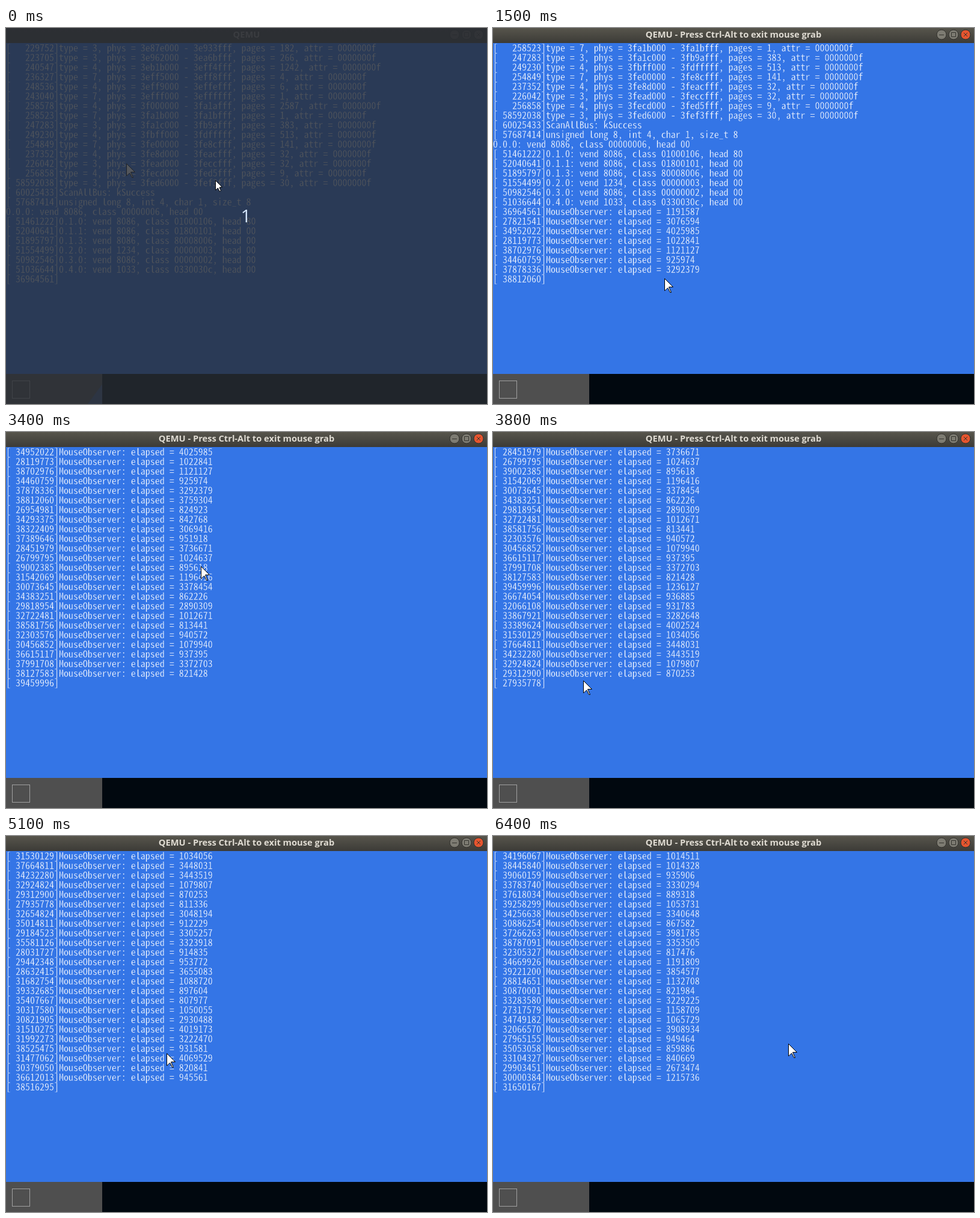
Animation, 800 px wide and 625 px high, one loop 8 s. Source, as an HTML page with a canvas:

```html
<!DOCTYPE html>
<html lang="en">
<head>
<meta charset="utf-8">
<title>QEMU</title>
<style>
html, body { margin: 0; width: 100%; height: 100%; overflow: hidden; background: #01080f; }
canvas { display: block; }
</style>
</head>
<body>
<canvas id="stage" width="800" height="625"></canvas>
<script>
const ctx = document.getElementById('stage').getContext('2d');
const LOOP = 8000, STEP = 100, ROWS = 25, CELL = 8, LINE = 16, TOP = 25;
const BLUE = '#3475e6';

let seed = 20;
function random(min, max) {
  seed = (seed * 1664525 + 1013904223) % 4294967296;
  return Math.floor(min + (max - min) * seed / 4294967296);
}

const entry = (tick, body) => ({ head: `[${String(tick).padStart(9)}]`, body });

// Memory map: type, pages, gap in pages before the block
const blocks = [[3, 182], [3, 266, 46], [4, 1242, 175], [7, 4], [4, 6], [7, 1], [4, 2587],
  [7, 1], [3, 383], [4, 513, 100], [7, 141], [4, 32], [3, 32], [4, 9], [3, 30]];

function memoryMap() {
  let page = 0x3e87e;
  return blocks.map(([type, pages, gap = 0], i) => {
    const from = page + gap;
    page = from + pages;
    const phys = `${from.toString(16)}000 - ${(page - 1).toString(16)}fff`;
    return entry(i < blocks.length - 1 ? random(220000, 260000) : 58592038,
      `type = ${type}, phys = ${phys}, pages = ${pages}, attr = 0000000f`);
  });
}

const devices = [
  '0.1.0: vend 8086, class 01000106, head 80',
  '0.1.1: vend 8086, class 01800101, head 00',
  '0.1.3: vend 8086, class 80008006, head 00',
  '0.2.0: vend 1234, class 00000003, head 00',
  '0.3.0: vend 8086, class 00000002, head 00',
  '0.4.0: vend 1033, class 0330030c, head 00'
];

// A mouse event is short, middling or slow, about equally often
function mouseEvent() {
  const kind = random(0, 3);
  const elapsed = kind === 0 ? random(800000, 970000)
    : kind === 1 ? random(1000000, 1240000) : random(2500000, 4100000);
  return entry(random(26500000, 39500000), `MouseObserver: elapsed = ${elapsed}`);
}

const log = [
  ...memoryMap(),
  entry(60025433, 'ScanAllBus: kSuccess'),
  entry(57687414, 'unsigned long 8, int 4, char 1, size_t 8'),
  { head: '', body: '0.0.0: vend 8086, class 00000006, head 00' },
  ...devices.map(body => entry(random(50200000, 52400000), body)),
  ...Array.from({ length: 85 }, mouseEvent)
];

// time, first visible log line
const scroll = [[1200, 0], [1700, 11], [1900, 11], [2000, 12], [2800, 12], [2900, 13],
  [3400, 26], [3700, 35], [3800, 36], [3900, 36], [4000, 37], [4200, 37], [4500, 43],
  [5100, 55], [6400, 84]];

// time, x, y of the pointer inside the guest
const path = [[1200, 200, 225], [1500, 285, 416], [1700, 300, 421], [2800, 300, 421],
  [2900, 313, 424], [3000, 430, 445], [3200, 605, 310], [3400, 324, 223], [3800, 150, 413],
  [4200, 150, 413], [4500, -1, 401], [5100, 267, 361], [5600, 325, 520], [6050, 508, 470],
  [6400, 491, 345]];

// Value n of the keys at time t, straight or on a smooth curve that rests at pauses
function sample(keys, t, n, smooth) {
  const last = keys.length - 1;
  if (t <= keys[0][0]) return keys[0][n];
  if (t >= keys[last][0]) return keys[last][n];
  const i = keys.findIndex(k => k[0] >= t);
  const a = keys[i - 1], b = keys[i], span = b[0] - a[0], p = (t - a[0]) / span;
  if (!smooth) return Math.round(a[n] + (b[n] - a[n]) * p);
  const still = (j, k) => keys[j][1] === keys[k][1] && keys[j][2] === keys[k][2];
  const slope = j => {
    if (j === 0 || j === last || still(j - 1, j) || still(j, j + 1)) return 0;
    return (keys[j + 1][n] - keys[j - 1][n]) / (keys[j + 1][0] - keys[j - 1][0]);
  };
  const q = 1 - p, ease = p * p * (3 - 2 * p);
  return Math.round(a[n] + (b[n] - a[n]) * ease
    + span * p * q * (q * slope(i - 1) - p * slope(i)));
}

function rect(x, y, w, h, fill) {
  ctx.fillStyle = fill;
  ctx.fillRect(x, y, w, h);
}

function text(str, x, y, font, fill, align = 'left') {
  ctx.font = font;
  ctx.fillStyle = fill;
  ctx.textAlign = align;
  ctx.fillText(str, x, y);
}

function polygon(points, x, y) {
  ctx.beginPath();
  points.forEach(([px, py]) => ctx.lineTo(x + px, y + py));
  ctx.closePath();
}

function pointer(points, x, y) {
  polygon(points, x, y);
  ctx.fillStyle = '#fff';
  ctx.fill();
  ctx.strokeStyle = '#000';
  ctx.lineWidth = 1;
  ctx.stroke();
}

const guestArrow = [[.5, .5], [14.5, 14.5], [7.5, 14.5], [11.5, 23.5], [9.5, 23.5],
  [6, 16.5], [5, 16.5], [.5, 21]];
const hostArrow = [[.5, .5], [11.5, 11.5], [7, 12], [9.5, 17.5], [7, 18.5], [4.5, 13], [.5, 16.5]];

// Pick the size whose advance equals one console cell
const family = '"Noto Sans Mono CJK JP", "Noto Sans Mono", "DejaVu Sans Mono", monospace';
ctx.font = `300 16px ${family}`;
const consoleFont = `300 ${16 * CELL / ctx.measureText('0').width}px ${family}`;

function button(x, fill, ink, sign) {
  const y = 11;
  ctx.beginPath();
  ctx.arc(x, y, 8, 0, 7);
  ctx.fillStyle = fill;
  ctx.fill();
  ctx.strokeStyle = '#32312d';
  ctx.lineWidth = 1;
  ctx.stroke();
  ctx.strokeStyle = ink;
  ctx.beginPath();
  if (sign === 'min') {
    ctx.moveTo(x - 4, y + .5);
    ctx.lineTo(x + 4, y + .5);
  } else if (sign === 'max') {
    ctx.rect(x - 3.5, y - 3.5, 7, 7);
  } else {
    ctx.moveTo(x - 3, y - 3);
    ctx.lineTo(x + 3, y + 3);
    ctx.moveTo(x + 3, y - 3);
    ctx.lineTo(x - 3, y + 3);
  }
  ctx.stroke();
}

function titleBar(active) {
  const shade = ctx.createLinearGradient(0, 0, 0, TOP);
  shade.addColorStop(0, active ? '#57554c' : '#3f3e3a');
  shade.addColorStop(1, '#3c3b37');
  rect(0, 0, 800, TOP, shade);
  text(active ? 'QEMU - Press Ctrl-Alt to exit mouse grab' : 'QEMU', 400, 16,
    'bold 14.67px "Open Sans", "Noto Sans", sans-serif', active ? '#dfdbd2' : '#807d78', 'center');
  const fill = active ? '#7d7b72' : '#53514b', ink = active ? '#35342f' : '#34332f';
  button(746, fill, ink, 'min');
  button(766, fill, ink, 'max');
  button(786, active ? '#e6552f' : fill, ink, 'close');
}

function desktop() {
  rect(0, TOP, 800, 550, BLUE);
  rect(0, TOP + 550, 800, 50, '#01080f');
  rect(0, TOP + 550, 160, 50, '#4f4f4f');
  ctx.strokeStyle = '#a0a0a0';
  ctx.lineWidth = 1;
  ctx.strokeRect(10.5, TOP + 561.5, 29, 29);
}

function consoleText(first) {
  for (let r = 0; r < ROWS; r++) {
    const { head, body } = log[first + r];
    const str = r < ROWS - 1 ? head + body : head;
    const y = TOP + 14 + r * LINE;
    text(str, 0, y, consoleFont, '#fff');
    // Trim the strokes to hairline weight
    ctx.strokeStyle = BLUE;
    ctx.lineWidth = .3;
    ctx.strokeText(str, 0, y);
  }
}

function guestPointer(x, y) {
  pointer(guestArrow, x, y);
  // Pixels left of the screen wrap to the end of the row above
  if (x < 0) pointer(guestArrow, x + 800, y - 1);
}

function countdown() {
  rect(0, 0, 800, 625, 'rgba(40,44,51,.8)');
  polygon([[160, 592], [160, 625], [136, 625]], 0, 0);
  ctx.fillStyle = 'rgba(43,58,85,.4)';
  ctx.fill();
  text('1', 399, 323, '500 30px "Open Sans", "Noto Sans", sans-serif', '#d3e5fb', 'center');
}

function draw(now) {
  const t = Math.floor(now % LOOP / STEP) * STEP;
  desktop();
  consoleText(sample(scroll, t, 1));
  guestPointer(sample(path, t, 1, true), sample(path, t, 2, true));
  titleBar(t >= 800);
  if (t < 500) countdown();
  if (t < 800) pointer(hostArrow, 348, 253);
}

const start = performance.now();
function tick() {
  draw(performance.now() - start);
  requestAnimationFrame(tick);
}
tick();
</script>
</body>
</html>
```
